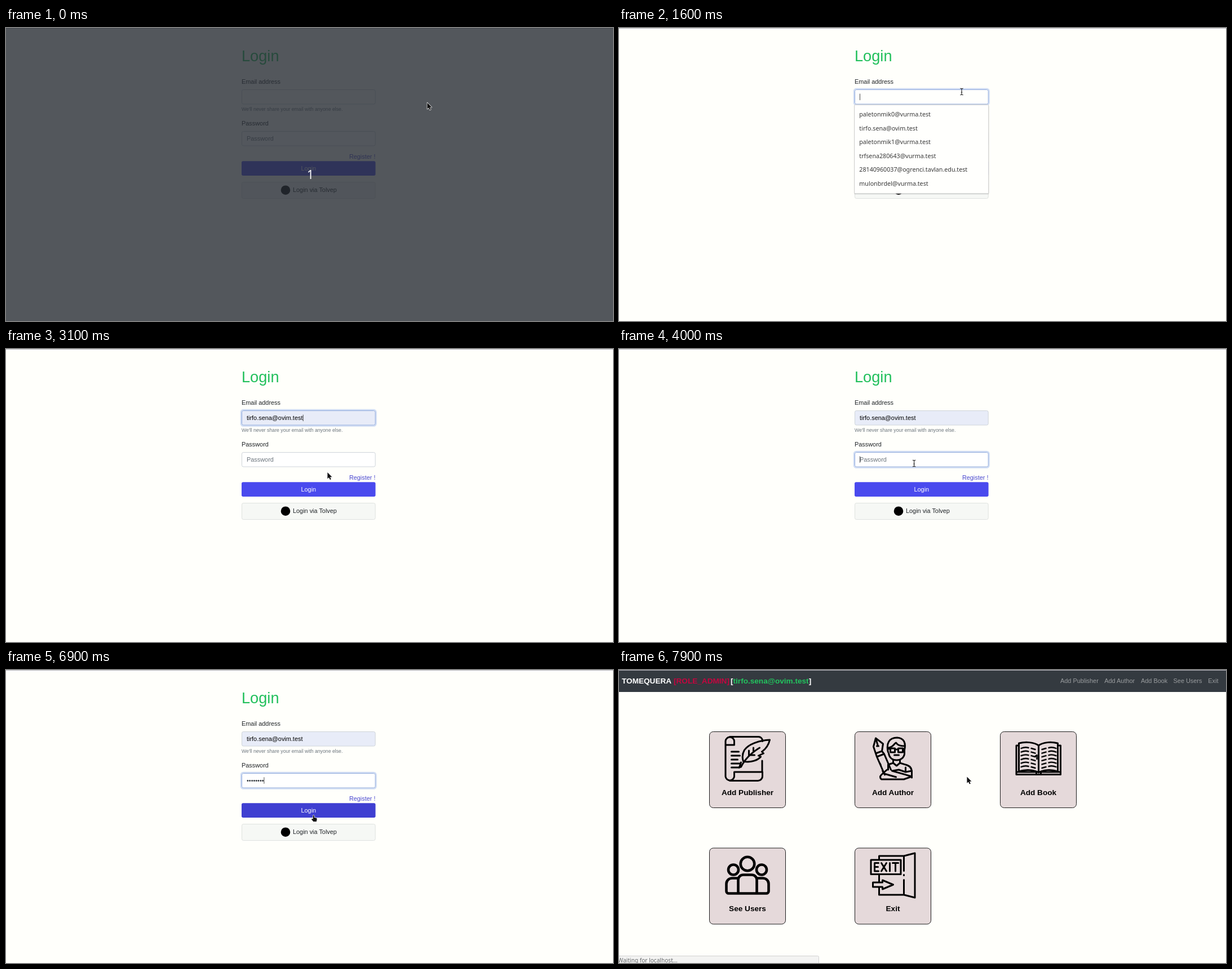
An HTML page for the animation above (8000 ms loop, 1077 by 520 pixels).

```html
<!DOCTYPE html>
<html lang="en">
<head>
<meta charset="utf-8">
<title>Login demo</title>
<style>
html, body { margin: 0; width: 100%; height: 100%; overflow: hidden; background: #fffffb; }
svg { display: block; font-family: "Liberation Sans", Arial, sans-serif; font-size: 10.9px; white-space: pre; }
.popup { font-family: "Noto Sans", "Open Sans", sans-serif; }
.bold { font-weight: bold; font-size: 13.6px; }
.icon { fill: none; stroke: #000; stroke-width: 3; stroke-linecap: round; stroke-linejoin: round; }
</style>
</head>
<body>
<svg id="stage" width="1077" height="520" viewBox="0 0 1077 520"></svg>
<script>
const LOOP = 8000, STEP = 100;
const USER = 'tirfo.sena@ovim.test';
const MAILS = ['paletonmik0@vurma.test', USER, 'paletonmik1@vurma.test', 'trfsena280643@vurma.test',
  '28140960037@ogrenci.tavlan.edu.test', 'mulonbrdel@vurma.test'];
const ROW = 24.45, ROW_TOP = 141.3;

const text = (x, y, s, fill, more = '') => `<text x="${x}" y="${y}" fill="${fill}" ${more}>${s}</text>`;
const rect = (x, y, w, h, r, fill, more = '') =>
  `<rect x="${x}" y="${y}" width="${w}" height="${h}" rx="${r}" fill="${fill}" ${more}/>`;
const path = (d, more = '') => `<path d="${d}" ${more}/>`;
const mid = 'text-anchor="middle"';

function field(id, y) {
  return rect(416.9, y - 1.6, 239.7, 28.7, 4, 'none', `id="${id}Ring" stroke="#cfdcf4" stroke-width="2.3"`) +
    rect(418.5, y, 236.7, 25.5, 2.7, '#fff', `id="${id}Box" stroke="#ced4da"`);
}

function loginPage() {
  return text(418, 59, 'Login', '#22c05c', 'font-size="27.2"') +
    text(418, 99, 'Email address', '#212529') + field('mail', 109.5) +
    text(427, 126, '', '#000', 'id="mailText"') +
    text(418, 147.3, "We'll never share your email with anyone else.", '#6c757d', 'font-size="8.72"') +
    text(418, 173, 'Password', '#212529') + field('pass', 183.5) +
    text(427, 200, 'Password', '#6c757d', 'id="hint"') +
    text(427, 200, '', '#343a40', 'id="dots"') +
    text(655.5, 231.5, 'Register !', '#4a48cf', 'text-anchor="end"') +
    rect(416.9, 235.1, 239.7, 28.2, 3.6, 'none', 'id="btnRing" stroke="#b4b4f6" stroke-width="2.3"') +
    rect(418, 236.2, 237.6, 25.8, 2.7, '#4a4aee', 'id="btn"') +
    text(536.8, 252.5, 'Login', '#fff', mid) +
    rect(418.5, 273.5, 236.7, 29, 2.7, '#f6f8f5', 'stroke="#dfe2e0"') +
    '<circle cx="496" cy="287.7" r="8.3"/>' +
    text(509, 290.7, 'Login via Tolvep', '#212529') +
    rect(0, 0, 0.8, 11.5, 0, '#222', 'id="caret"');
}

function dropdown() {
  const rows = MAILS.map((m, i) =>
    text(426.3, (ROW_TOP + ROW * i + 16).toFixed(1), m, '#383838', 'font-size="10.7" font-weight="500"'));
  return rect(417, 137.5, 239.5, 158, 2, '#000', 'opacity=".1"') +
    rect(417.6, 136.3, 238.2, 157.5, 1.5, '#fffffd', 'stroke="#c6c6c6" stroke-width=".9"') +
    rect(418, 0, 237.5, ROW, 0, '#e1e1e1', 'id="hover"') + `<g class="popup">${rows.join('')}</g>`;
}

function scrollIcon() {
  let lines = '';
  for (let i = 0; i < 5; i++) lines += `M12 ${28 + 7 * i}h${[13, 15, 11, 16, 14][i]}`;
  return path('M9 1.5H60a7 7 0 0 1 7 7v1M1.5 9A7.8 7.8 0 0 1 17 9V16H1.5M66.5 44V64' +
      'M9 79.5H59a8 8 0 0 0 8-8V64H17v8a7.8 7.8 0 0 1-15.5 0V9') + path(lines) +
    path('M80 7C60 8 42 15 35 25C31 32 31 39 33 45C46 48 59 43 64 37L60 35L69 31L66 28C73 23 78 16 80 7Z' +
      'M25 56L29 55C34 45 44 32 62 21M45 34H53M51 27V21M43 35V26M26 56L29 47');
}

function authorIcon() {
  return path('M32 29C28 13 34 3 48 3C60 4 64 12 61 25V32C60 39 54 43 47 43C39 43 34 38 33 31M33 21C41 20 44 12 46 12C49 17 55 18 61 18') +
    path('M36 22h8v7h-8zM50 22h8v7h-8zM44 24h6M33 23h3M58 23h3M43 34h8M41 43V48L47 53L53 48V43M41 48L32 51M53 48L66 52Q74 55 74 64V74M32 51V60') +
    path('M10 4L6 19L10 31L21 27L23 14ZM10 4L14 18M12 18h3M10 31L12 37L25 32L21 27M12 37L26 69M25 32L37 60M17 48l2 4M22 61l1 3') +
    path('M30 60L20 69Q16 73 20 77H60L74 72M25 67L46 73M39 62L74 72M39 62L51 60L63 64V56M63 64L74 62');
}

function bookIcon() {
  let lines = '';
  for (let i = 0; i < 6; i++) {
    const y = 22 + i * 6.6;
    lines += `M10 ${y}q7-3 13-1m5 1l7 2M72 ${y}q-7-3-13-1m-5 1l-7 2`;
  }
  return path('M6 17H1.5V68.5H80V17H75M41 17C33 11 18 10 6 13V63C18 59 33 60 41 65C49 60 63 59 75 63V13C63 10 49 11 41 17V64M2 64H80M37 68V64M45 68V64') +
    path(lines, 'stroke-width="2.4"') + path('M35 36L38 34V41', 'stroke-width="2.4"');
}

function usersIcon() {
  return '<g stroke-width="4.6"><circle cx="40.5" cy="20.5" r="12.3"/><circle cx="15.5" cy="31" r="9"/><circle cx="65.5" cy="31" r="9"/>' +
    path('M24 73V49a9 9 0 0 1 9-9H48a9 9 0 0 1 9 9V73M24 46H13a10 10 0 0 0-10 10V69a4 4 0 0 0 4 4H74a4 4 0 0 0 4-4V56a10 10 0 0 0-10-10H57') + '</g>';
}

function exitIcon() {
  return path('M1.5 13.5H54.5V39H1.5ZM16 13V6.5H60L79.5 1.5V80.5L60 75.5H16V62M16 39V53M60 6.5V33M60 40v1M60 49V75') +
    path('M5 53.5H22V49.5L41 57.5L22 65.5V61.5H5Z') +
    path('M15 19H8V33.5H15M8 26H14M20 19L29 33.5M29 19L20 33.5M35 19V33.5M40 19H50M45 19V33.5');
}

function card(col, row, label, icon) {
  const x = 160.5 + 258 * col, y = 109.5 + 206.5 * row;
  return rect(x, y, 135, 135, 6.8, '#e5d9da', 'stroke="#1c1c1c"') +
    `<g class="icon" transform="translate(${x + 27} ${y + 7.5})">${icon}</g>` +
    text(x + 67.5, y + 112, label, '#000', `class="bold" ${mid}`);
}

function homePage() {
  const links = [[783, 'Add Publisher'], [861.3, 'Add Author'], [926, 'Add Book'], [983.6, 'See Users'], [1045.3, 'Exit']];
  return rect(0, 0, 1077, 520, 0, '#fffffb') + rect(0, 1, 1077, 38, 0, '#343a40') +
    '<g class="bold">' + text(5, 24.4, 'TOMEQUERA', '#fff') + text(97, 24.4, '[ROLE_ADMIN]', '#c5053f') +
    text(198, 24.4, `[<tspan fill="#22c55e">${USER}</tspan>]`, '#fff') + '</g>' +
    links.map(l => text(l[0], 23.3, l[1], '#9a9d9f')).join('') +
    card(0, 0, 'Add Publisher', scrollIcon()) + card(1, 0, 'Add Author', authorIcon()) +
    card(2, 0, 'Add Book', bookIcon()) + card(0, 1, 'See Users', usersIcon()) + card(1, 1, 'Exit', exitIcon());
}

function cursors() {
  const edge = 'fill="#111" stroke="#fff" stroke-width="1.3" paint-order="stroke" stroke-linejoin="round"';
  return path('M.4 .4V11.8L3 9.4L4.9 13.6L6.8 12.7L5 8.7H8.5Z', `id="arrow" ${edge}`) +
    path('M-2.7-5.8Q-.4-5.8 0-4.8Q.4-5.8 2.7-5.8M0-5V5M-2.7 5.8Q-.4 5.8 0 4.8Q.4 5.8 2.7 5.8M-1.2 1H1.2',
      'id="beam" fill="none" stroke="#222" stroke-width="1.1"') +
    path('M-1 .8Q0-.2 1 .8V4.2L5.2 5.2Q6.2 5.6 6 7L5.2 11.6H-.4L-3.6 7.4Q-3.4 6-2 6.6L-1 7.4Z', `id="hand" ${edge}`);
}

document.getElementById('stage').innerHTML =
  rect(0, 0, 1077, 520, 0, '#fffffb') + loginPage() +
  `<g id="menu">${dropdown()}</g><g id="home">${homePage()}</g>` +
  rect(0, 0, 1077, 1, 0, '#b6b6bd') +
  '<g id="status">' + rect(-5, 507.5, 359.5, 20, 2, '#f3f3f2', 'stroke="#d2d2d2"') +
  text(-2, 519, 'Waiting for localhost…', '#66696b', 'class="popup" font-size="10.1"') + '</g>' +
  '<g id="cover">' + rect(0, 0, 1077, 520, 0, 'rgb(41,45,53)', 'opacity=".8"') +
  text(540, 267.5, '1', '#fff', `class="popup" font-size="21" ${mid}`) + '</g>' + cursors();

const el = {};
document.querySelectorAll('#stage [id]').forEach(n => el[n.id] = n);
const show = (n, on) => n.setAttribute('display', on ? 'inline' : 'none');
const set = (n, attrs) => { for (const k in attrs) n.setAttribute(k, attrs[k]); };
const ramp = (t, a, b) => Math.max(0, Math.min(1, (t - a) / (b - a)));
const mix = (a, b, k) => `rgb(${a.map((v, i) => Math.round(v + (b[i] - v) * k))})`;

// time, x, y, shape from that time on
const moves = [[0, 747, 132, 'arrow'], [500, 747, 132, 'arrow'], [900, 632, 102, 'arrow'], [1000, 632, 102, 'arrow'],
  [1100, 608, 113, 'beam'], [2100, 608, 113, 'beam'], [2200, 592, 150, 'arrow'], [2300, 592, 150, 'arrow'],
  [2400, 575, 203, 'arrow'], [2500, 575, 203, 'arrow'], [2600, 576, 175, 'arrow'], [3000, 576, 175, 'arrow'],
  [3200, 564, 262, 'arrow'], [3300, 550, 277, 'arrow'], [3400, 532, 235, 'arrow'], [3500, 523.6, 203, 'beam'],
  [6400, 523.6, 203, 'beam'], [6600, 532, 224, 'arrow'], [6700, 540, 246, 'hand'], [6900, 545.7, 257.5, 'hand'],
  [7400, 545.7, 257.5, 'hand'], [7500, 555, 247, 'arrow'], [7900, 617, 189, 'arrow']];
const keys = [4500, 4600, 4700, 5000, 5200, 5500, 6000, 6400];

function moveCursor(t) {
  let i = moves.length - 1;
  while (moves[i][0] > t) i--;
  const a = moves[i], b = moves[i + 1] || a;
  const k = a === b ? 0 : ramp(t, a[0], b[0]);
  for (const s of ['arrow', 'beam', 'hand']) show(el[s], s === a[3]);
  set(el[a[3]], { transform: `translate(${a[1] + (b[1] - a[1]) * k} ${a[2] + (b[2] - a[2]) * k})` });
}

function focus(id, k) {
  set(el[id + 'Ring'], { opacity: k });
  set(el[id + 'Box'], { stroke: mix([206, 212, 218], [146, 172, 220], k) });
}

function draw(ms) {
  const t = Math.floor(ms / STEP) * STEP;
  show(el.cover, t < 500);
  show(el.menu, t >= 1600 && t < 2900);
  show(el.home, t >= 7500);
  show(el.status, t >= 7200);

  focus('mail', ramp(t, 1400, 1600) - ramp(t, 3400, 3600));
  focus('pass', ramp(t, 3400, 3600) - ramp(t, 7100, 7300));
  set(el.btnRing, { opacity: ramp(t, 7100, 7300) });
  set(el.btn, { fill: mix([74, 74, 238], [63, 63, 209], ramp(t, 6600, 6800)) });

  const row = t < 2200 ? -1 : t < 2400 ? 0 : 1;
  const picked = t >= 2900;
  show(el.hover, row >= 0);
  set(el.hover, { y: ROW_TOP + ROW * Math.max(row, 0) });
  el.mailText.textContent = row < 0 ? '' : MAILS[row];
  set(el.mailText, { 'font-size': picked ? 10.9 : 9.07, y: picked ? 126 : 125.4 });
  set(el.mailBox, { fill: row < 0 ? '#fffffd' : '#e8ecf8' });

  const n = keys.filter(k => k <= t).length;
  show(el.hint, n === 0);
  el.dots.textContent = '•'.repeat(n);

  const inPass = t >= 3500;
  show(el.caret, t >= 1500 && t < 7200);
  set(el.caret, { x: inPass ? 427 + 3.815 * n : picked ? 526.8 : 427, y: inPass ? 190.3 : 116.6 });
  moveCursor(t);
}

function frame() {
  draw(performance.now() % LOOP);
  requestAnimationFrame(frame);
}
frame();
</script>
</body>
</html>
```
